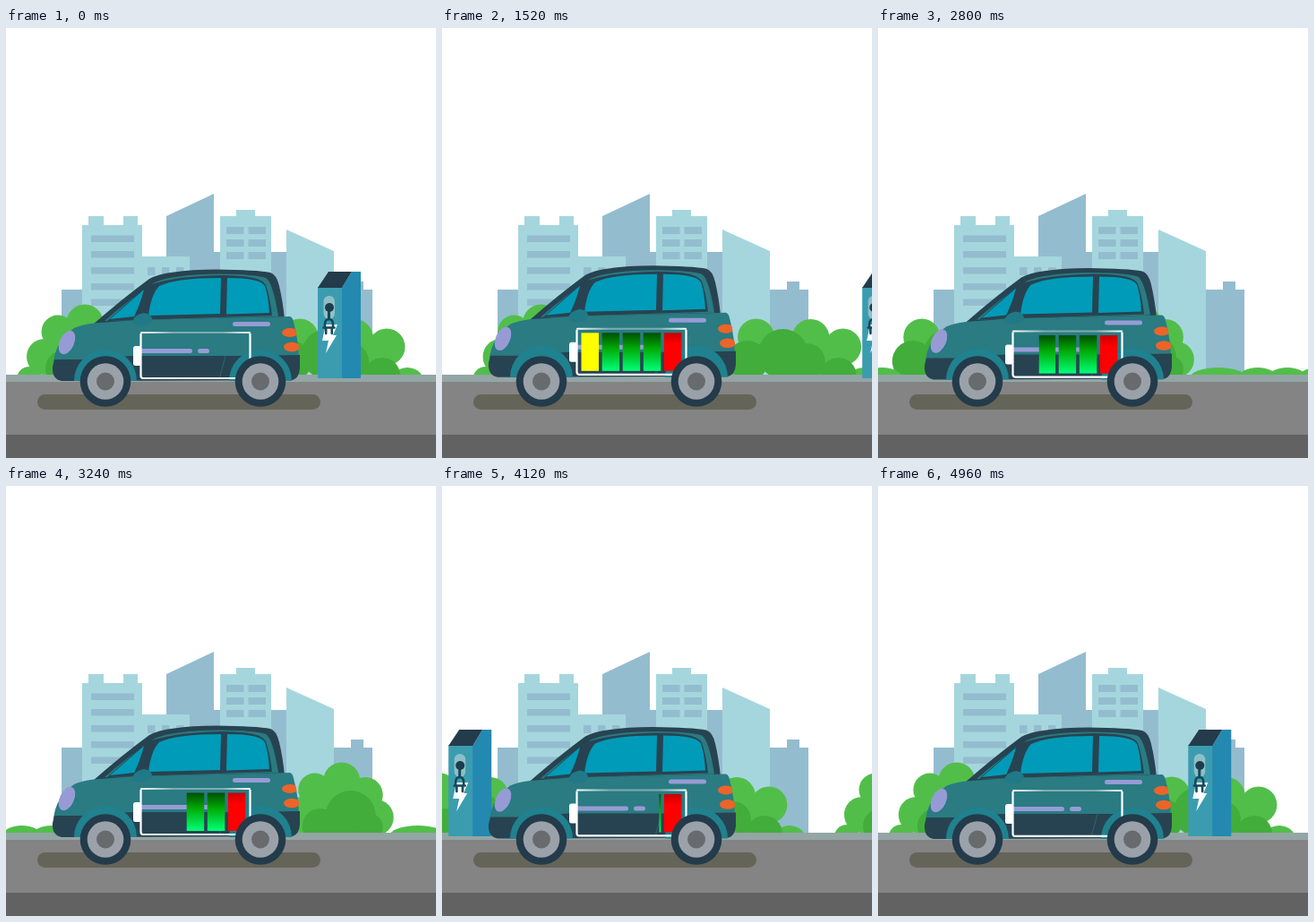
An HTML page for the animation above (5000 ms loop, 480 by 480 pixels).

```html
<!DOCTYPE html>
<html lang="en">
<head>
<meta charset="utf-8">
<title>Electric car</title>
<style>
  html, body { margin: 0; width: 100%; height: 100%; overflow: hidden; background: #fff; }
  svg { display: block; width: 100%; height: 100%; }
  .pale { fill: #a5d6dd; }
  .haze { fill: #94bccf; }
  .leaf { fill: #52be4a; }
  .shade { fill: #42ad3a; }
  .teal { fill: #2a7b82; }
  .dark { fill: #274351; }
  .glass { fill: #009bb8; }
  .lilac { fill: #979bd5; }
  .lamp { fill: #ec642a; }
</style>
</head>
<body>
<svg viewBox="0 0 480 480">
  <defs>
    <linearGradient id="green" x2="0" y2="1">
      <stop offset="0" stop-color="#004f00"/>
      <stop offset=".42" stop-color="#00ac08"/>
      <stop offset="1" stop-color="#00ff78"/>
    </linearGradient>
    <linearGradient id="red" x2="0" y2="1">
      <stop offset="0" stop-color="#c80000"/>
      <stop offset=".3" stop-color="#f00"/>
    </linearGradient>
    <linearGradient id="rim">
      <stop offset="0" stop-color="#fff"/>
      <stop offset=".3" stop-color="#7fabb0"/>
      <stop offset=".75" stop-color="#7fabb0"/>
      <stop offset="1" stop-color="#fff"/>
    </linearGradient>
    <clipPath id="level"><rect id="levelBox" y="330" width="130" height="70"/></clipPath>
    <clipPath id="shell"><path d="M98 329L318 322Q328 345 328 372V394H52V372Q56 340 98 329Z"/></clipPath>
    <g id="wheel">
      <circle r="28.300" fill="#233b4a"/>
      <circle r="20.300" fill="#9aa1a9"/>
      <circle r="10" fill="#686b6d"/>
    </g>
    <g id="bushes"></g>
  </defs>

  <rect width="480" height="480" fill="#fff"/>

  <g id="city">
    <path class="haze" d="M62 292H90V388H62ZM179 210L232 185V388H179ZM232 250H313V388H232ZM366 292H385V283H399V292H409V388H366Z"/>
    <path class="pale" d="M85 220H92V210H109V220H131V210H147V220H152V255H205V388H85ZM239 210H257V203H278V210H296V388H239ZM313 225L366 249V388H313Z"/>
  </g>

  <use id="bushA" href="#bushes"/>
  <use id="bushB" href="#bushes"/>

  <rect y="387" width="480" height="9" fill="#94a5a5"/>
  <rect y="395" width="480" height="60" fill="#848484"/>
  <rect y="454" width="480" height="26" fill="#626262"/>
  <rect x="35" y="409" width="316" height="17" rx="8.500" fill="#656459"/>

  <g id="station">
    <path fill="#3b9cb0" d="M348 289H376V391H348Z"/>
    <path fill="#2389b0" d="M375 290L386 272H396V391H375Z"/>
    <path fill="#233b4b" d="M348 290L360 272H386L375 290Z"/>
    <rect x="354.500" y="299" width="12.500" height="26" rx="6.200" fill="#8fbfc6"/>
    <path fill="#fff" d="M357 331H370L365 343H369L357 363L360 349H353Z"/>
    <g id="arm" fill="none" stroke="#164857" stroke-linecap="round">
      <path id="cable" stroke-width="3"/>
      <g id="plug" stroke-width="2.600">
        <path d="M-4.500 8V6Q-4.500 0 0 0Q4.500 0 4.500 6V8M-6 9.500H6M-3.300 10V16M3.300 10V16"/>
      </g>
    </g>
    <circle cx="361" cy="312" r="5" fill="#1d3c4c"/>
  </g>

  <g id="body">
    <path class="dark" d="M97 331Q130 302 160 280Q178 270 235 269.500Q280 270 295 273Q302 275 305 288Q309 305 311 325Z"/>
    <path class="teal" d="M110 327Q140 301 166 284Q185 275 240 274.500Q278 275 290 279Q298 284 304 322Z"/>
    <path class="dark" d="M113 327L157 288Q185 277 240 276Q285 276 290 287Q295 302 297 321Z"/>
    <path class="teal" d="M98 329.500L145 326L317 322Q320 323 321 328Q327 350 327 374H53Q55 350 76 335Q84 331 98 329.500Z"/>
    <path class="dark" d="M54 370H85L140 366H262L328 365V380Q327 391 320 393L84 394H62Q51 392 52 378Z"/>
    <path d="M76 394A35 35 0 0 1 146 394ZM249 394A35 35 0 0 1 319 394Z" fill="#20818f"/>
    <path class="glass" d="M116 325L154 292Q150 308 143 322ZM159 321Q162 297 171 288Q190 279 240 279L239 319ZM247 279Q284 279 289 288Q293 300 294 318L246 319.500Z"/>
    <path d="M141 329Q142 320 154 318Q163 319 163 326Q160 333 146 332Z" fill="#207987"/>
    <path d="M245 366L238 392" stroke="#2f6471" fill="none"/>
    <ellipse class="lilac" rx="8" ry="14" transform="translate(68 351) rotate(24)"/>
    <g clip-path="url(#shell)">
      <ellipse class="lamp" cx="317" cy="340" rx="9" ry="5"/>
      <ellipse class="lamp" cx="319" cy="356" rx="9" ry="5.300"/>
    </g>
    <rect class="lilac" x="253" y="328" width="42" height="5" rx="2.500"/>
    <rect class="lilac" x="148" y="358" width="60" height="5" rx="2.500"/>
    <rect class="lilac" x="214" y="358" width="13" height="5" rx="2.500"/>

    <g id="cells" clip-path="url(#level)"></g>
    <rect x="142" y="355" width="9" height="22" rx="2.500" fill="#fff"/>
    <path d="M150.500 341V388Q150.500 391 153 391H270Q272.500 391 272.500 388V341" fill="none" stroke="#fff" stroke-width="2.200"/>
    <rect x="150" y="339" width="123" height="2" rx="1" fill="url(#rim)"/>
  </g>
  <use href="#wheel" x="111" y="394.500"/>
  <use href="#wheel" x="284" y="394.500"/>
</svg>
<script>
const LOOP = 5000, PERIOD = 486;
const $ = id => document.getElementById(id);

function add(parent, tag, attrs) {
  const el = document.createElementNS('http://www.w3.org/2000/svg', tag);
  for (const key in attrs) el.setAttribute(key, attrs[key]);
  parent.append(el);
}

function windows(xs, ys, width, height) {
  for (const x of xs) for (const y of ys)
    add($('city'), 'rect', { class: 'haze', x, y, width, height });
}
windows([95], [231.5, 249, 267, 285, 302.5], 48, 7.5);
windows([158, 174, 190], [267], 8.5, 9);
windows([246, 270.5], [222, 236, 250], 19.5, 8);

function clump(name, circles) {
  for (const [cx, cy, r] of circles) add($('bushes'), 'circle', { class: name, cx, cy, r });
}
clump('leaf', [
  [26, 392, 14], [43, 367, 20], [58, 339, 18.5], [88, 329, 20.5], [114, 345, 20], [126, 370, 20], [85, 358, 34],
  [328, 345, 20.5], [389, 346, 21], [425, 356, 20.5], [405, 375, 28], [448, 399, 20]
]);
clump('shade', [
  [64, 380, 20], [98, 368, 28], [118, 381, 16],
  [318, 372, 23], [358, 364, 28], [385, 372, 20], [420, 388, 20]
]);
for (const x of [173, 217, 250, 284])
  add($('bushes'), 'ellipse', { class: 'leaf', cx: x, cy: 391, rx: x < 200 ? 32 : 22, ry: 12 });

['#ff0', 'url(#green)', 'url(#green)', 'url(#green)', 'url(#red)'].forEach((fill, i) =>
  add($('cells'), 'rect', { x: 155.5 + 23.1 * i, y: 344.5, width: 19.5, height: 42.5, fill }));

const clamp = u => Math.max(0, Math.min(1, u));
const ramp = (t, from, to) => clamp((t - from) / (to - from));
const smooth = u => u * u * (3 - 2 * u);
const shift = (el, x, y) => el.setAttribute('transform', `translate(${x} ${y})`);

// Pulls away to the right, later rolls in from the left.
function stationX(t) {
  const speedUp = 4.17e-4;
  if (t < 2500) return speedUp * Math.max(0, t - 982) ** 2;
  return -speedUp * (5025 - t) ** 2;
}

function draw(t) {
  const scroll = PERIOD * smooth(ramp(t, 1000, LOOP));
  shift($('bushA'), scroll, 0);
  shift($('bushB'), scroll - PERIOD, 0);
  shift($('station'), stationX(t), 0);

  const reach = smooth(ramp(t, 0, 500)) - smooth(ramp(t, 960, 1200));
  const tail = 13 + 13 * reach;
  $('arm').setAttribute('transform', `translate(360.500 312) rotate(${58 * reach})`);
  $('cable').setAttribute('d', `M0 0V${tail}`);
  shift($('plug'), 0, tail);

  const bob = t > 1000 ? -2.1 * (1 - Math.cos(t / 1000 * 2 * Math.PI)) : 0;
  shift($('body'), 0, bob);

  const level = ramp(t, 0, 1000) - ramp(t, 2280, 4700);
  $('levelBox').setAttribute('x', 270 - 115 * level);
}

function tick(now) {
  draw(now % LOOP);
  requestAnimationFrame(tick);
}
draw(0);
requestAnimationFrame(tick);
</script>
</body>
</html>
```
